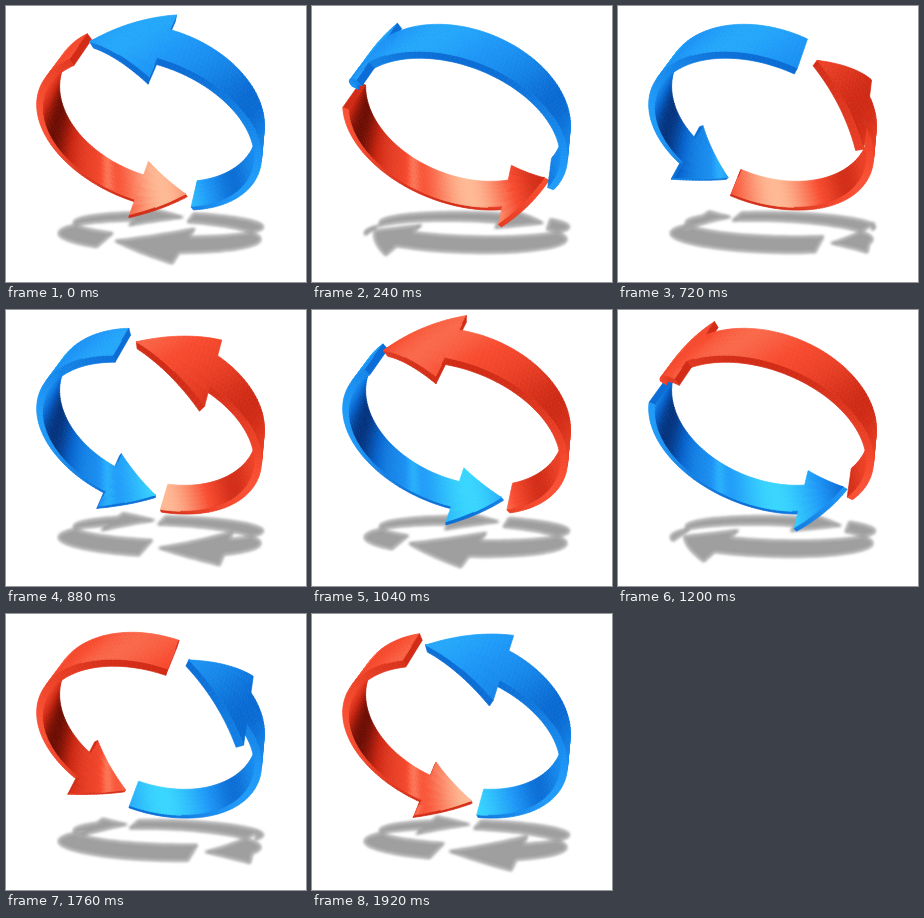
An HTML page with a canvas that plays this animation: 300x276 px, repeating every 2000 ms.

```html
<!DOCTYPE html>
<html lang="en">
<head>
<meta charset="utf-8">
<title>Rotating arrows</title>
<style>
html, body { margin: 0; width: 100%; height: 100%; overflow: hidden; background: #fff; }
canvas { display: block; width: 300px; height: 276px; }
</style>
</head>
<body>
<canvas id="stage" width="300" height="276"></canvas>
<script>
const ctx = document.getElementById('stage').getContext('2d');
const LOOP = 2000, STEP = 80;
const RAD = Math.PI / 180;

// Arrow shape: angles from the tail, v across the band (0 near rim, 1 far rim)
const BASE = 140.6, TIP = 173.6;
const HEAD_LO = -0.6, HEAD_HI = 1.6, TIP_V = 0.5;
const INNER = 0.945;

// Perspective frames: centre, two ring axes and the band's width direction
const RING = { c: [137, 143], a: [60, 72.5], b: [90, -17], z: [11, -29] };
const GROUND = { c: [145, 226], a: [44, -12], b: [86, 9], z: [10, -11] };

function project(frame, deg, v, r = 1) {
  const p = r * Math.cos(deg * RAD), q = r * Math.sin(deg * RAD);
  const depth = 1 + 0.19 * p - 0.19 * q + 0.07 * v;
  const at = i => frame.c[i] + (frame.a[i] * p + frame.b[i] * q + frame.z[i] * v) / depth;
  return [at(0), at(1), depth];
}

const mix = (a, b, t) => a + (b - a) * t;

// Brightness around the ring: a base level with soft lights and shades
function bump(deg, center, width) {
  const d = ((deg - center + 540) % 360 + 360) % 360 - 180;
  return Math.exp(-((d / width) ** 2));
}
const outerLight = d => .62 + .12 * bump(d, 155, 22) - .24 * bump(d, 96, 20)
  + .2 * bump(d, 199, 6) - .35 * bump(d, 222, 15);
const innerLight = d => .6 + .36 * bump(d, 338, 28) - .55 * bump(d, 243, 24)
  - .2 * bump(d, 32, 16) + .14 * bump(d, 296, 5);
const rimLight = d => .54 + .14 * Math.cos(2 * (d - 50) * RAD);

const BLUE = [[3, 42, 112], [6, 98, 204], [30, 152, 248], [60, 222, 255]];
const RED = [[92, 8, 0], [200, 36, 16], [248, 76, 48], [255, 200, 162]];

function tint(palette, t) {
  const x = Math.min(.999, Math.max(0, t)) * 3, i = Math.floor(x);
  return `rgb(${palette[i].map((c, k) => Math.round(mix(c, palette[i + 1][k], x - i)))})`;
}

function limits(u) {
  if (u < BASE) return [0, 1];
  const t = (u - BASE) / (TIP - BASE);
  return [mix(HEAD_LO, TIP_V, t), mix(HEAD_HI, TIP_V, t)];
}

function span(from, to, count) {
  return Array.from({ length: count + 1 }, (_, i) => mix(from, to, i / count));
}

// Keeps only faces turned to the viewer
function addFace(faces, pts, color) {
  const [a, b, c, d] = pts;
  const turn = (c[0] - a[0]) * (d[1] - b[1]) - (c[1] - a[1]) * (d[0] - b[0]);
  if (turn <= 0) return;
  faces.push({ pts, color, depth: (a[2] + b[2] + c[2] + d[2]) / 4 });
}

function addStrip(faces, tail, palette, us) {
  const rows = 6;
  for (let i = 0; i + 1 < us.length; i++) {
    const u0 = us[i], u1 = us[i + 1];
    // a band segment ending at the base keeps the band's width
    const e0 = limits(u0), e1 = u1 === BASE ? [0, 1] : limits(u1);
    const d0 = tail + u0, d1 = tail + u1, mid = (d0 + d1) / 2;
    for (let k = 0; k < rows; k++) {
      const s = k / rows, t = (k + 1) / rows;
      const v = [mix(...e0, s), mix(...e1, s), mix(...e1, t), mix(...e0, t)];
      const quad = r => [project(RING, d0, v[0], r), project(RING, d1, v[1], r),
        project(RING, d1, v[2], r), project(RING, d0, v[3], r)];
      const lean = mid + 9 * ((v[0] + v[2]) / 2 - .5);
      addFace(faces, quad(1), tint(palette, outerLight(lean)));
      addFace(faces, quad(INNER).reverse(), tint(palette, innerLight(lean)));
    }
    addFace(faces, [project(RING, d0, e0[0], INNER), project(RING, d1, e1[0], INNER),
      project(RING, d1, e1[0]), project(RING, d0, e0[0])], tint(palette, rimLight(mid)));
  }
}

function addCap(faces, deg, v0, v1, palette) {
  addFace(faces, [project(RING, deg, v0, INNER), project(RING, deg, v0),
    project(RING, deg, v1), project(RING, deg, v1, INNER)], tint(palette, .4));
}

function addArrow(faces, tail, palette) {
  addStrip(faces, tail, palette, span(0, BASE, 70));
  addStrip(faces, tail, palette, span(BASE, TIP, 18));
  addCap(faces, tail, 0, 1, palette);
  addCap(faces, tail + BASE, HEAD_LO, 0, palette);
  addCap(faces, tail + BASE, 1, HEAD_HI, palette);
}

function trace(pts) {
  pts.forEach((p, i) => i ? ctx.lineTo(p[0], p[1]) : ctx.moveTo(p[0], p[1]));
  ctx.closePath();
}

function drawShadow(tails) {
  ctx.save();
  ctx.filter = 'blur(1.5px)';
  ctx.fillStyle = ctx.strokeStyle = '#9f9f9f';
  ctx.lineWidth = 2;
  ctx.lineJoin = 'round';
  ctx.beginPath();
  for (const tail of tails) {
    const edge = side => [
      ...span(0, BASE, 60).map(u => project(GROUND, tail + u, side)),
      ...span(BASE, TIP, 12).map(u => project(GROUND, tail + u, limits(u)[side]))
    ];
    trace([...edge(0), ...edge(1).reverse()]);
  }
  ctx.fill();
  ctx.stroke();
  ctx.restore();
}

function draw(turn) {
  ctx.fillStyle = '#fff';
  ctx.fillRect(0, 0, 300, 276);
  drawShadow([turn, turn + 180]);

  const faces = [];
  addArrow(faces, turn, BLUE);
  addArrow(faces, turn + 180, RED);
  faces.sort((a, b) => b.depth - a.depth);
  ctx.lineWidth = .7;
  ctx.lineJoin = 'round';
  for (const face of faces) {
    ctx.fillStyle = ctx.strokeStyle = face.color;
    ctx.beginPath();
    trace(face.pts);
    ctx.fill();
    ctx.stroke();
  }
}

function tick() {
  const step = Math.floor((performance.now() % LOOP) / STEP);
  draw(step * 360 * STEP / LOOP);
  requestAnimationFrame(tick);
}
tick();
</script>
</body>
</html>
```
